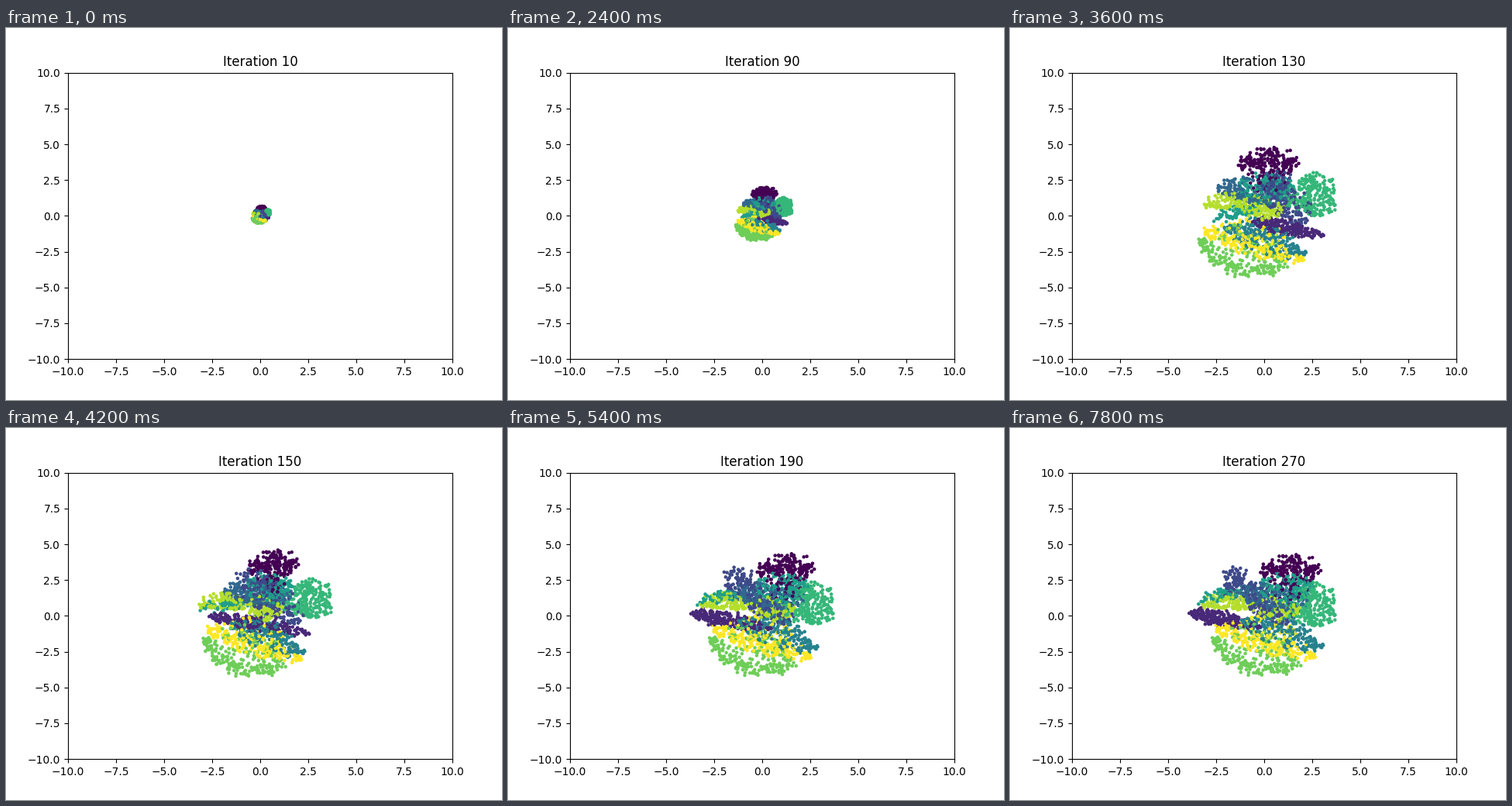
These frames come from a looping animation (640 by 480 pixels, 8000 ms). A matplotlib script:

```python
import numpy as np
import matplotlib.pyplot as plt
from matplotlib.animation import FuncAnimation

INTERVAL, FRAMES, HOLD = 100, 80, 3
PER_DIGIT = 250
CENTER = 0.2 + 0.3j
rng = np.random.default_rng(7)


def ribbon(digit, start, end, bend, width, drift, share=1.0):
    """Scatter one cluster along an arc, with points as complex numbers."""
    count = int(PER_DIGIT * share)
    along, across = rng.uniform(-1, 1, (2, count))
    chord = end - start
    normal = 1j * chord / abs(chord)
    across *= width * np.sqrt(1 - abs(along) ** 3)
    spine = (start + end) / 2 + along * chord / 2 + (1 - along ** 2) * bend * normal
    side = normal * abs(chord) / 2 + 2 * along * bend * chord / abs(chord)
    points = spine + across * side / abs(side)
    points += 0.06 * (rng.normal(size=count) + 1j * rng.normal(size=count))
    # A few points of every cluster stray towards the middle.
    points += 0.65 * rng.random(count) ** 4 * (CENTER - points)
    return np.full(count, digit), along, points, np.full(count, drift)


clusters = [
    ribbon(0, -1.3 + 3.4j, 1.6 + 3.4j, 0.8, 0.65, 1.15 - 0.5j),
    ribbon(1, -0.7 - 0.5j, 3.1 - 1.4j, -0.2, 0.25, -3.3 + 0.6j),
    ribbon(2, 0.2 + 2.7j, 1.2 + 2.2j, 0, 0.6, -2.3 + 0.3j, 0.3),
    ribbon(2, 0.0 + 2.2j, 2.0 - 0.6j, 0.3, 0.9, -1.0 - 0.1j, 0.7),
    ribbon(3, -2.5 + 1.8j, 1.4 + 1.2j, 0.4, 0.9, 0.9 - 0.4j),
    ribbon(4, -2.2 - 0.9j, 2.1 - 2.8j, -0.2, 0.6, 0.9 + 0.5j),
    ribbon(5, -2.7 - 0.3j, -0.8 + 0.6j, 0, 0.4, -0.8 + 1.2j, 0.3),
    ribbon(5, -1.5 + 1.5j, 1.5 + 2.0j, 0.4, 0.8, 1.1, 0.7),
    ribbon(6, 2.3 + 2.9j, 2.8 - 0.1j, 0.3, 0.9, -0.7j),
    ribbon(7, -3.5 - 1.6j, 1.1 - 3.6j, -1.3, 0.45, 0.7 + 0.1j),
    ribbon(8, -3.1 + 0.6j, -0.9 + 0.8j, 0.3, 0.6, -0.1, 0.5),
    ribbon(8, -1.2 + 0.6j, 1.0 + 0.4j, 0, 0.9, 0.8 - 0.1j, 0.5),
    ribbon(9, -3.2 - 1.0j, 2.1 - 3.1j, -0.45, 0.4, 0.6 + 0.2j),
]
digits, along, home, drift = (np.concatenate(part) for part in zip(*clusters))
order = rng.permutation(len(digits))


def progress(iteration, begin, end):
    return np.clip((iteration - begin) / (end - begin), 0, 1)


def positions(iteration):
    """Grow slowly, burst open, then let the clusters drift and settle."""
    grow = 1 - (1 - progress(iteration, 10, 90)) ** 3
    burst = progress(iteration, 90, 130)
    scale = 0.13 + 0.28 * grow + 0.59 * burst ** 2 * (3 - 2 * burst)
    settle = 1 - (1 - progress(iteration, 130, 220)) ** 2
    # The leading end of a cluster arrives before its tail.
    points = scale * home + drift * settle ** (2 ** along)
    points = points[order] + 0.04 + 0.06j
    return np.column_stack([points.real, points.imag])


fig, ax = plt.subplots(figsize=(6.4, 4.8), dpi=100)
ax.set(xlim=(-10, 10), ylim=(-10, 10))
dots = ax.scatter(*positions(10).T, s=5, c=digits[order], cmap="viridis")
title = ax.set_title("Iteration 10")


def update(frame):
    iteration = 10 * (frame // HOLD + 1)
    dots.set_offsets(positions(iteration))
    title.set_text(f"Iteration {iteration}")
    return dots, title


anim = FuncAnimation(fig, update, frames=FRAMES, interval=INTERVAL,
                     repeat=True, repeat_delay=0)
plt.show()
```
